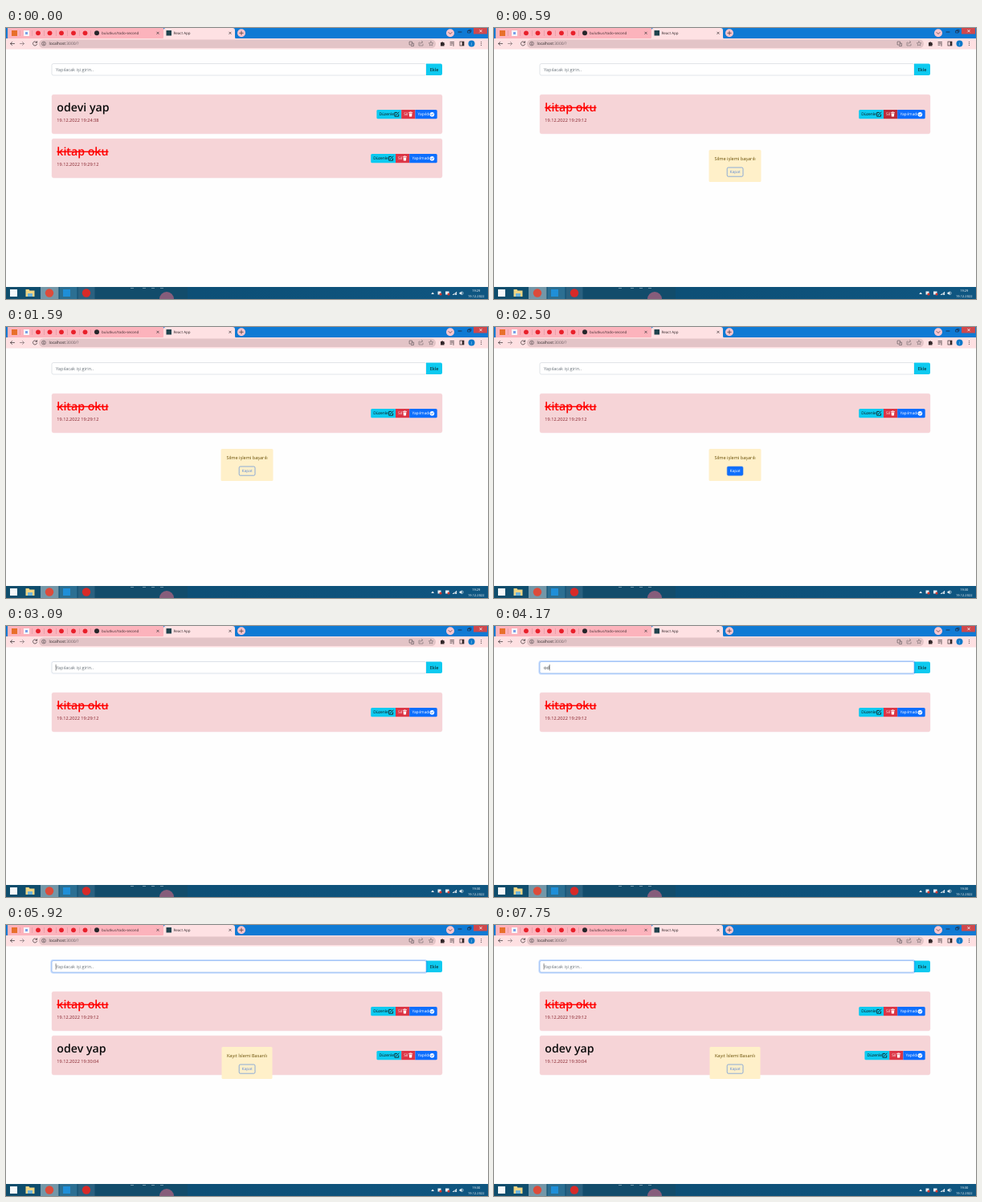
These frames come from a looping animation (600x338 px, 8 s). An HTML page:

```html
<!DOCTYPE html>
<html lang="tr">
<head>
<meta charset="utf-8">
<title>Todo</title>
<style>
  html, body { margin: 0; height: 100%; overflow: hidden; background: #fefefe; }
  svg { display: block; width: 100vw; height: 100vh; }
  text { font-family: "Open Sans", "Noto Sans", sans-serif; font-size: 5.6px; white-space: pre; text-rendering: geometricPrecision; }
  .small { font-size: 4.9px; }
  .tiny { font-size: 4.5px; }
  .clock { font-size: 4px; }
  .mid { text-anchor: middle; }
  .title { font-size: 14.2px; font-weight: 600; }
  .done { fill: #f00; text-decoration: line-through; }
  .line { fill: none; stroke-width: .8; stroke-linecap: round; stroke-linejoin: round; }
  .thin { stroke-width: .6; }
</style>
</head>
<body>
<svg id="stage" viewBox="0 0 600 338" xmlns="http://www.w3.org/2000/svg"></svg>
<script>
const LOOP = 8000;
const CYAN = '#0dcaf0', BLUE = '#0d6efd', RED = '#dc3545';

const rect = (x, y, w, h, fill, more = '') =>
  `<rect x="${x}" y="${y}" width="${w}" height="${h}" fill="${fill}" ${more}/>`;
const circle = (x, y, r, fill, more = '') =>
  `<circle cx="${x}" cy="${y}" r="${r}" fill="${fill}" ${more}/>`;
const text = (x, y, str, fill, cls = '', more = '') =>
  `<text x="${x}" y="${y}" fill="${fill}" class="${cls}" ${more}>${str}</text>`;
const line = (d, color, cls = '') =>
  `<path class="line ${cls}" d="${d}" stroke="${color}"/>`;
const cross = (x, y, r, color) =>
  line(`M${x - r} ${y - r}l${2 * r} ${2 * r}m0 ${-2 * r}l${-2 * r} ${2 * r}`, color);

function browser() {
  const ink = '#4b4145', pale = '#75686c';
  const separators = [17.5, 32.5, 47.5, 62, 76.5, 91, 105.5]
    .map(x => rect(x, 3, .5, 7, '#d88d98')).join('');
  const videoTabs = [40, 54.5, 69, 84, 98.5]
    .map(x => circle(x, 6.3, 2.9, '#e8202a')).join('');
  return rect(0, 0, 600, 14, '#0f7ad4') +
    rect(2, 0, 194, 14, '#fcb3bc') + separators + videoTabs +
    rect(7, 3, 7, 7, '#e8702a') + rect(22, 3, 7, 7, '#f4f6fb') + rect(24, 5, 3, 3, '#7aa2e8') +
    circle(113, 6.3, 3, '#25262a') +
    text(119, 8, 'bulutkus/todo-second', '#3c2a2e', 'tiny') +
    cross(189, 6.3, 1.2, ink) +
    `<path d="M193 14q3 0 3-3v-8q0-3 3-3h83q3 0 3 3v8q0 3 3 3z" fill="#fee1e3"/>` +
    rect(199.5, 3, 6.5, 6.5, '#20434d') +
    text(208.5, 8, 'React App', '#33282b', 'tiny') +
    cross(279, 6.3, 1.2, ink) +
    circle(293, 6.3, 5, '#fcc5cc') + line('M290.7 6.3h4.6M293 4v4.6', ink) +
    circle(553, 6.3, 5, '#fcc5cc') + line('M551 5.5l2 2l2-2', ink) +
    rect(582, 0, 17, 7.5, '#d0484c') +
    line('M563 5h4', '#223') + line('M575 3.5h3v2.5h-3zM576 3.5v-1.2h3v2.5h-1', '#223', 'thin') +
    cross(591, 3.7, 1.3, '#fff') +
    rect(0, 13, 600, 13.5, '#fee0e2') +
    line('M10.5 19.5h-5m2-2l-2 2l2 2', ink) + line('M17.5 19.5h5m-2-2l2 2l-2 2', '#8d7b7f') +
    line('M38.3 18a2.6 2.6 0 1 0 .3 2.2M38.6 16.6v1.7h-1.8', ink) +
    rect(41, 14.5, 494, 10.5, '#e3c4c7', 'rx="5.2"') +
    circle(47, 19.5, 2.4, 'none', `stroke="${ink}" stroke-width=".6"`) + line('M47 19.4v1.2M47 18.2v.1', ink) +
    text(53.5, 21.2, 'localhost<tspan fill="#6a5c60">:3000/?</tspan>', '#2c2628', 'small') +
    line('M502.5 17h3v4h-3zM505 19h2.5v3.5h-3', pale) +
    line('M515 18h-1v4h5v-2M515.5 20q.5-2.5 3-2.5m-1-1.2l1.3 1.2l-1.3 1.2', pale, 'thin') +
    line('M529 16.8l.8 1.8l2 .2l-1.5 1.3l.4 1.9l-1.7-1l-1.7 1l.4-1.9l-1.5-1.3l2-.2z', pale, 'thin') +
    `<path d="M541 18h1.3q.8-2 1.6 0h1.6v1.5q1.8.8 0 1.6v1.4h-4.5z" fill="#33282b"/>` +
    line('M553 17.5h4.5M553 19.3h4.5M553 21.2h2', ink) + line('M557 20.3v2.2', ink) +
    rect(565, 17, 5, 5, 'none', 'stroke="#33282b" stroke-width=".7"') + rect(567.7, 17, 2.3, 5, '#33282b') +
    circle(579.5, 19.5, 4, '#0b78c9') + text(579.5, 21, 'J', '#fff', 'clock mid') +
    [17.5, 19.5, 21.5].map(y => circle(591.5, y, .6, ink)).join('');
}

function form() {
  return rect(57, 44.5, 466, 14.5, '#fff', 'rx="2" stroke="#ced4da" stroke-width=".6"') +
    `<path d="M523 44.5h18q2 0 2 2v10.5q0 2-2 2h-18z" fill="${CYAN}"/>` +
    text(533, 54, 'Ekle', '#111', 'mid') +
    `<g id="focus">${rect(56.2, 43.7, 467.6, 16.1, 'none', 'rx="2.6" stroke="#0d6efd" stroke-opacity=".25" stroke-width="1.5"')}
     ${rect(57, 44.5, 466, 14.5, 'none', 'rx="2" stroke="#86b7fe" stroke-width=".5"')}</g>` +
    text(62, 54, 'Yapılacak işi girin..', '#6c757d', '', 'id="hint"') +
    text(62, 54, '', '#212529', '', 'id="typed" style="font-size:5.8px"') +
    `<path id="spelling" class="line" d="M62 55.6h14" stroke="#e58a8a"/>` +
    rect(62, 48, .5, 7.6, '#222', 'id="caret"');
}

// One to-do card, drawn with its top edge at y = 0.
function card(id, title, date, done) {
  const left = done ? 454.2 : 461.4, mid = left + 30.8, right = mid + 17.2;
  return `<g id="${id}">` +
    rect(57.2, .2, 485.6, 48.6, '#f6d4d7', 'rx="2" stroke="#f3c5ca" stroke-width=".4"') +
    text(63.3, 21, title, '#0b0b0b', 'title' + (done ? ' done' : '')) +
    text(63.3, 34, date, '#842029') +
    `<path d="M${mid} 19h${left + 1.5 - mid}q-1.5 0-1.5 1.5v8.2q0 1.5 1.5 1.5h${mid - left - 1.5}z" fill="${CYAN}"/>` +
    rect(mid, 19, right - mid, 11.2, RED, 'class="delete"') +
    `<path d="M${right} 19h${535.2 - right}q1.5 0 1.5 1.5v8.2q0 1.5-1.5 1.5h${right - 535.2}z" fill="${BLUE}"/>` +
    text(left + 3, 26.4, 'Düzenle', '#111', 'small') +
    line(`M${left + 25.3} 22.4h-2.8v4.8h4.8v-2.4M${left + 24.2} 25.6l3.5-3.6`, '#111') +
    text(mid + 3, 26.4, 'Sil', '#fff', 'small') +
    line(`M${mid + 9.2} 22.6h4.4M${mid + 10.7} 21.9h1.4`, '#fff') +
    `<path d="M${mid + 9.5} 23.5h3.8l-.4 4h-3z" fill="#fff"/>` +
    text(right + 3.2, 26.4, done ? 'Yapılmadı' : 'Yapıldı', '#fff', 'small') +
    circle(530.4, 24.7, 2.8, '#fff') + line('M529 24.7l1.1 1.1l1.9-2.1', BLUE) + '</g>';
}

function dialog(id, message, width) {
  return `<g id="${id}">` +
    rect(300 - width / 2, 152, width, 40, '#fff0c9', 'rx="1.5"') +
    text(300, 165.2, message, '#664d03', 'mid') +
    rect(290.2, 174, 19.8, 11.2, BLUE, 'class="close" fill-opacity="0" rx="1.6" stroke="#3f7de0" stroke-width=".6"') +
    text(300.1, 181.4, 'Kapat', '#5b8ad6', 'small mid', 'data-label') + '</g>';
}

function taskbar() {
  const ghosts = [155, 170, 181, 192].map(x => rect(x, 324, 4, 1, '#6d93a8')).join('');
  return `<defs><linearGradient id="bar"><stop offset="0" stop-color="#0f4d6c"/>
      <stop offset=".4" stop-color="#0d4f76"/><stop offset="1" stop-color="#0f5681"/></linearGradient>
      <clipPath id="barClip">${rect(0, 323, 600, 15, '#000')}</clipPath></defs>` +
    `<g clip-path="url(#barClip)">` + rect(0, 323, 600, 15, 'url(#bar)') +
    rect(110, 323, 116, 15, '#124c6b') + ghosts + circle(200, 338, 9, '#a4627f', 'opacity=".8"') +
    rect(43, 323, 22.5, 15, '#7397a8') + rect(66.5, 323, 22, 15, '#2c6f92') + rect(89.5, 323, 21, 15, '#2a6180') +
    rect(5, 326, 9, 9, '#f5f8fa') +
    `<path d="M24.5 326h4l1 1.5h6v7.5h-11z" fill="#efd584"/>` + rect(27, 331, 6, 4, '#6fb5dc') +
    circle(54, 330.5, 5.2, '#dd4b3a') + rect(71, 326, 9, 9, '#1f8fd8') + circle(100, 330.5, 5.2, '#d82a28') +
    '<path d="M529.3 332l1.8-2.4l1.8 2.4z" fill="#fff"/>' +
    rect(537.5, 328.5, 4, 4, '#e7edf1') + circle(541, 332, 1.6, '#d8372f') +
    rect(547, 328.5, 4.5, 4, '#e7edf1') + circle(551, 332, 1.5, '#d8372f') +
    [0, 1, 2, 3].map(i => rect(556 + i * 1.4, 332 - i, .9, 1 + i, '#fff')).join('') +
    '<path d="M564.5 329.7h1.2l1.7-1.5v5l-1.7-1.5h-1.2z" fill="#fff"/>' + line('M568.7 329.2q1 1.5 0 3', '#fff', 'thin') +
    text(585.3, 329.3, '19:29', '#fff', 'clock mid', 'id="clock"') +
    text(585.3, 336, '19.12.2022', '#fff', 'clock mid') + '</g>';
}

const stage = document.getElementById('stage');
stage.innerHTML = rect(0, 0, 600, 338, '#fefefe') + browser() + form() +
  card('oldTask', 'odevi yap', '19.12.2022 19:24:38', false) +
  card('doneTask', 'kitap oku', '19.12.2022 19:29:12', true) +
  card('newTask', 'odev yap', '19.12.2022 19:30:04', false) +
  dialog('deleted', 'Silme işlemi başarılı', 65) +
  dialog('saved', 'Kayıt İslemi Basarılı', 63) + taskbar();

const $ = selector => stage.querySelector(selector);
const ui = {
  oldTask: $('#oldTask'), doneTask: $('#doneTask'), newTask: $('#newTask'),
  oldDelete: $('#oldTask .delete'), doneDelete: $('#doneTask .delete'),
  deleted: $('#deleted'), saved: $('#saved'),
  close: $('#deleted .close'), closeLabel: $('#deleted [data-label]'),
  focus: $('#focus'), hint: $('#hint'), typed: $('#typed'),
  spelling: $('#spelling'), caret: $('#caret'), clock: $('#clock')
};

const keyTimes = [3840, 4170, 4340, 4580, 4750, 5090, 5340, 5590];
const ease = (t, from, to) => {
  const p = Math.min(1, Math.max(0, (t - from) / (to - from)));
  return p * p * (3 - 2 * p);
};
const mix = (a, b, p) => `rgb(${a.map((v, i) => Math.round(v + (b[i] - v) * p))})`;
const deleteColor = hover => mix([220, 53, 69], [187, 45, 59], hover);
const show = (el, on) => el.setAttribute('visibility', on ? 'visible' : 'hidden');
const moveTo = (el, y) => el.setAttribute('transform', `translate(0 ${y})`);

function caretVisible(t) {
  if (t < 3090) return false;
  if (t < 5920) return t < 3500 || t >= 3840;
  return t < 6170 || (t >= 6670 && t < 7250) || t >= 7670;
}

function draw(t) {
  const removed = t >= 500, added = t >= 5920;
  show(ui.oldTask, !removed);
  show(ui.newTask, added);
  moveTo(ui.oldTask, 83);
  moveTo(ui.doneTask, removed ? 83 : 138);
  moveTo(ui.newTask, 138);
  ui.oldDelete.setAttribute('fill', deleteColor(ease(t, 80, 250)));
  ui.doneDelete.setAttribute('fill', deleteColor(removed ? 1 - ease(t, 960, 1090) : 0));

  show(ui.deleted, removed && t < 2920);
  show(ui.saved, added);
  const hover = ease(t, 2240, 2420);
  ui.close.setAttribute('fill-opacity', hover);
  ui.closeLabel.setAttribute('fill', mix([91, 138, 214], [255, 255, 255], hover));

  const typed = added ? '' : 'odev yap'.slice(0, keyTimes.filter(k => t >= k).length);
  ui.typed.textContent = typed;
  show(ui.hint, !typed);
  show(ui.spelling, typed.includes(' '));
  ui.focus.setAttribute('opacity', ease(t, 3060, 3250));
  ui.caret.setAttribute('x', 61.8 + (typed ? ui.typed.getComputedTextLength() : 0));
  show(ui.caret, caretVisible(t));
  ui.clock.textContent = t < 1920 ? '19:29' : '19:30';
}

function frame() {
  draw(performance.now() % LOOP);
  requestAnimationFrame(frame);
}
frame();
</script>
</body>
</html>
```
